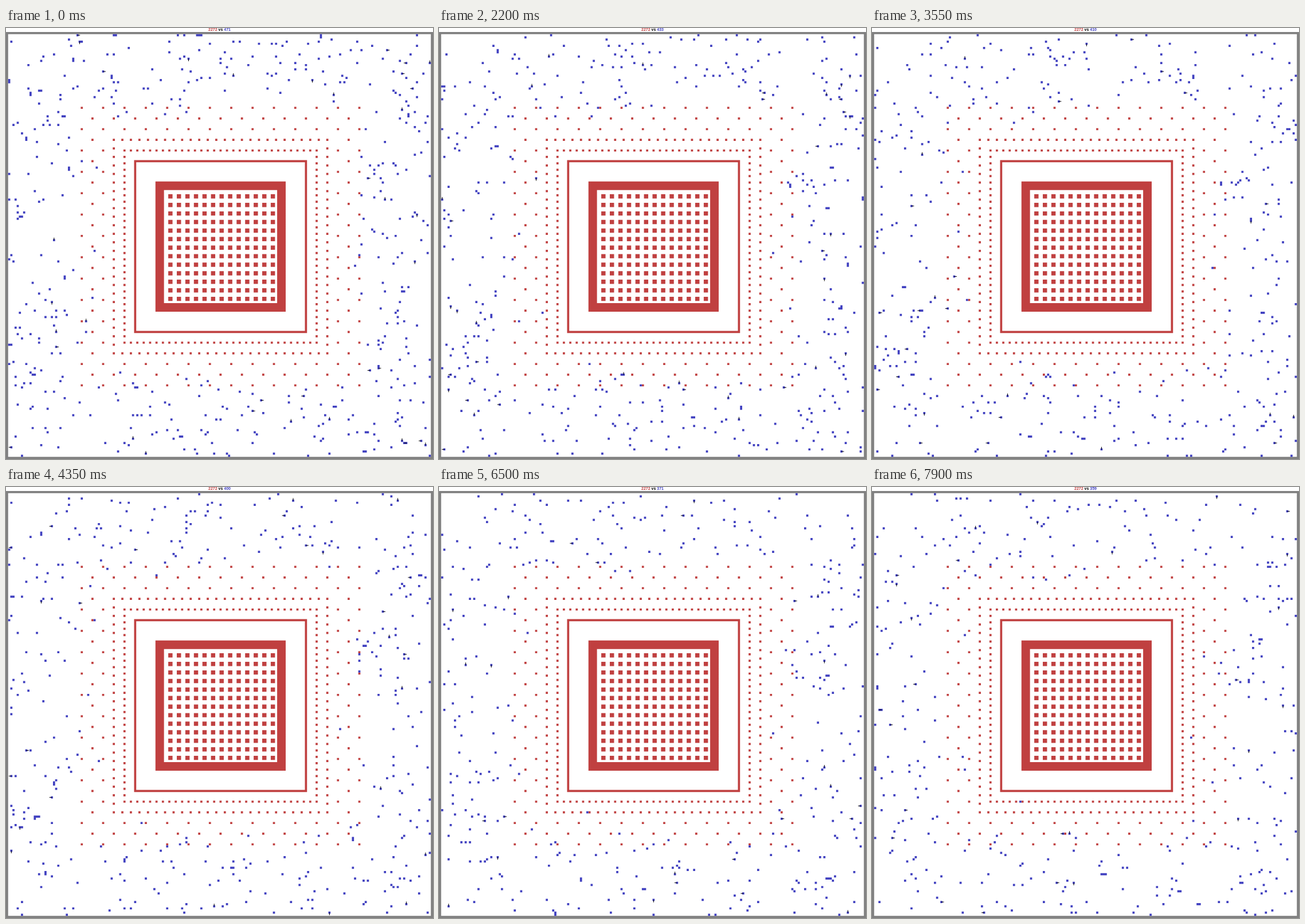
An HTML page with a canvas for the animation above (8000 ms loop, 745 by 752 pixels).

```html
<!DOCTYPE html>
<html lang="en">
<head>
<meta charset="utf-8">
<title>Swarm against fortress</title>
<style>
  html, body { margin: 0; width: 100%; height: 100%; overflow: hidden; background: #fff; }
  canvas { position: absolute; left: 0; top: 0; display: block; }
  #score {
    position: absolute; left: 0; top: 0; width: 745px; text-align: center;
    font: bold 7px/6px "Liberation Sans", Arial, sans-serif; color: #000; white-space: pre;
  }
  .red { color: #c04040; }
  .blue { color: #4040c0; }
</style>
</head>
<body>
<canvas id="field" width="745" height="752"></canvas>
<div id="score"><span class="red">2272</span> vs <span class="blue" id="count">471</span></div>
<script>
const LOOP = 8000, SLOT = 50, CELL = 3.725, TOP = 7, SIZE = 200, MID = 100;
const RED = '#c04040', BLUE = '#4040c0', GREY = '#808080';
const DIRS = [[1, 0], [0, 1], [-1, 0], [0, -1]];

// A turn in every slot during the opening, then in two slots out of three.
const times = Array.from({ length: LOOP / SLOT }, (_, slot) => slot)
  .filter(slot => slot < 15 || slot % 3 !== 0)
  .map(slot => slot * SLOT);

// Swarm size at a few key times; linear in between.
const SURVIVORS = [[0, 471], [1000, 452], [2200, 433], [3550, 410], [5150, 388], [6500, 371], [7900, 359]];

function survivorsAt(t) {
  const k = Math.max(1, SURVIVORS.findIndex(([time]) => time >= t));
  const [t0, a] = SURVIVORS[k - 1], [t1, b] = SURVIVORS[k];
  return Math.round(a + (b - a) * (t - t0) / (t1 - t0));
}

let seed = 20417;
function random() {
  seed = (seed + 0x6D2B79F5) | 0;
  let r = Math.imul(seed ^ seed >>> 15, 1 | seed);
  r = r + Math.imul(r ^ r >>> 7, 61 | r) ^ r;
  return ((r ^ r >>> 14) >>> 0) / 4294967296;
}
const pick = n => Math.floor(random() * n);

// Fortress: rectangles in cells [x, y, width, height], built around the middle.
const fortress = [];
function frame(radius, thick) {
  const near = MID - radius, far = MID + radius + 1 - thick, n = 2 * radius + 1;
  fortress.push([near, near, n, thick], [near, far, n, thick],
    [near, near, thick, n], [far, near, thick, n]);
}
function dottedRing(radius, step) {
  for (let d = -radius; d < radius; d += step) {
    for (const [x, y] of [[d, -radius], [radius, d], [-d, radius], [-radius, -d]]) {
      fortress.push([MID + x, MID + y, 1, 1]);
    }
  }
}
function blocks(radius, step) {
  for (let x = -radius; x <= radius; x += step) {
    for (let y = -radius; y <= radius; y += step) fortress.push([MID + x, MID + y, 2, 2]);
  }
}
blocks(24, 4);
frame(30, 4);
frame(40, 1);
dottedRing(45, 3);
dottedRing(50, 4);
for (let radius = 55; radius <= 65; radius += 5) dottedRing(radius, 10);

const walls = new Set();
for (const [x, y, w, h] of fortress) {
  for (let i = 0; i < w; i++) for (let j = 0; j < h; j++) walls.add((x + i) * SIZE + y + j);
}
const inside = v => v > 0 && v < SIZE - 1;
const isFree = (x, y) => inside(x) && inside(y) && !walls.has(x * SIZE + y);

// The swarm starts around the fortress, denser towards the corners.
function spawn() {
  for (;;) {
    const x = 1 + pick(SIZE - 2), y = 1 + pick(SIZE - 2);
    const dx = Math.abs(x - MID), dy = Math.abs(y - MID);
    const chance = Math.min(1, (Math.max(dx, dy) - 57) / 18) * (0.7 + 0.3 * Math.min(dx, dy) / MID);
    if (isFree(x, y) && random() < chance) return { x, y, heading: pick(4), aim: -1 };
  }
}

// One cell per turn, hopping over a single wall cell.
function walk(bot) {
  const heading = random() < 1 / 3 ? bot.heading : pick(4);
  const aim = random() < 0.075 ? pick(4) : -1;
  const [dx, dy] = DIRS[heading];
  const reach = [1, 2].find(n => isFree(bot.x + dx * n, bot.y + dy * n)) || 0;
  return { x: bot.x + dx * reach, y: bot.y + dy * reach, heading, aim };
}

let swarm = Array.from({ length: survivorsAt(0) }, spawn);
const turns = times.map(t => swarm = swarm.slice(0, survivorsAt(t)).map(walk));

const ctx = document.getElementById('field').getContext('2d');
const count = document.getElementById('count');

// One path per colour, so that touching cells leave no seams.
function fillCells(color, rects) {
  ctx.fillStyle = color;
  ctx.beginPath();
  for (const [x, y, w, h] of rects) ctx.rect(x * CELL, TOP + y * CELL, w * CELL, h * CELL);
  ctx.fill();
}

function drawAims(bots) {
  ctx.beginPath();
  for (const { x, y, aim } of bots.filter(bot => bot.aim >= 0)) {
    const cx = (x + 0.5) * CELL, cy = TOP + (y + 0.5) * CELL, [dx, dy] = DIRS[aim];
    ctx.moveTo(cx, cy);
    ctx.lineTo(cx + dx * 4.4, cy + dy * 4.4);
  }
  ctx.stroke();
}

function draw(bots) {
  ctx.clearRect(0, 0, 745, 752);
  fillCells(GREY, [[0, 0, SIZE, SIZE]]);
  fillCells('#fff', [[1, 1, SIZE - 2, SIZE - 2]]);
  fillCells(RED, fortress);
  fillCells(BLUE, bots.map(({ x, y }) => [x, y, 1, 1]));
  drawAims(bots);
  count.textContent = bots.length;
}

let shown = -1;
const start = performance.now();
function tick() {
  const t = (performance.now() - start) % LOOP;
  const turn = times.findLastIndex(time => time <= t);
  if (turn !== shown) draw(turns[shown = turn]);
  requestAnimationFrame(tick);
}
tick();
</script>
</body>
</html>
```
